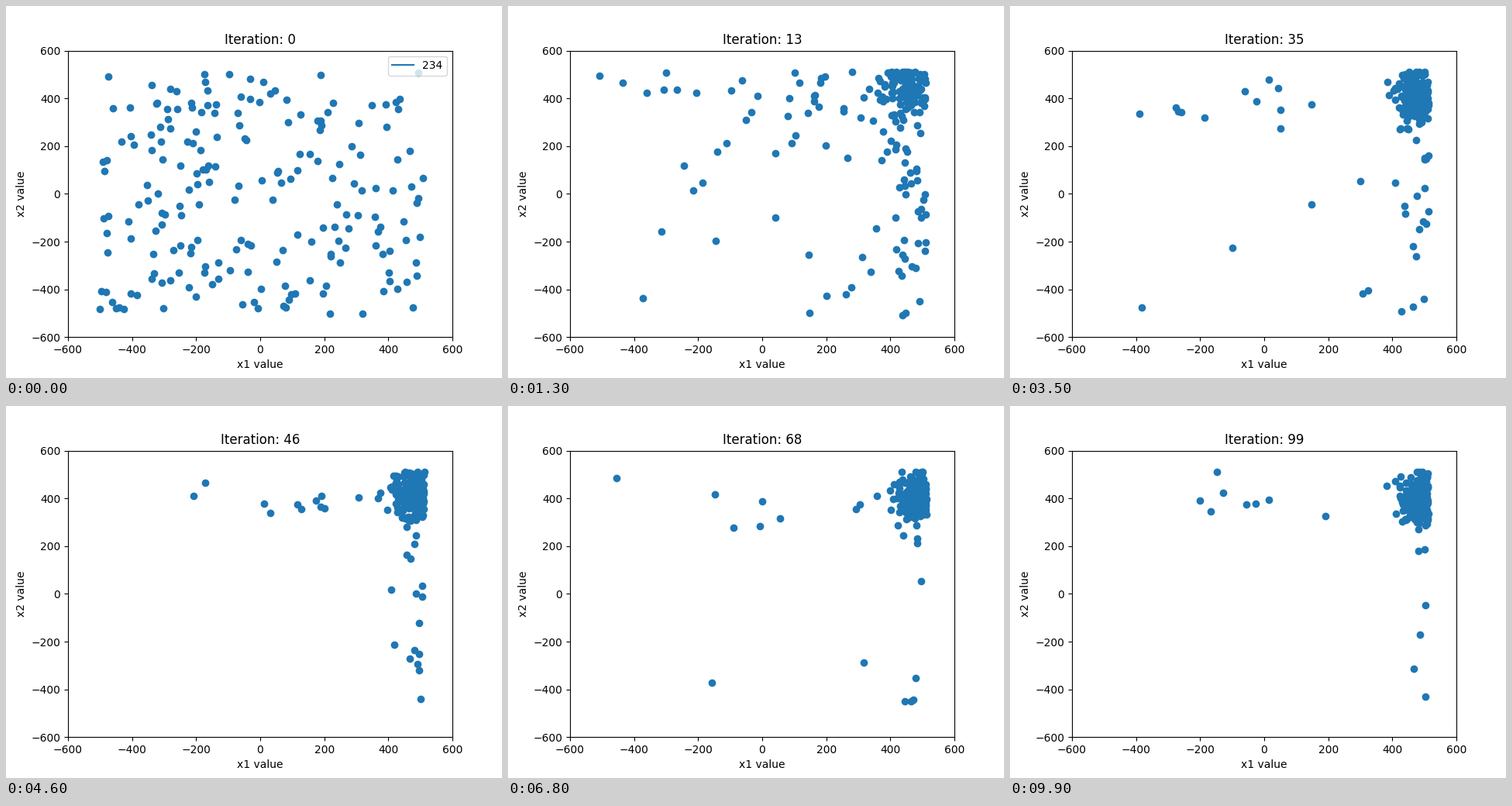
A matplotlib script that plays this animation: 640x480 px, repeating every 10 s.

```python
import matplotlib.pyplot as plt
import numpy as np
from matplotlib.animation import FuncAnimation

GENERATIONS = 100
POP_SIZE = 200
LIMIT = 512

plt.rcParams["text.kerning_factor"] = 6


def coordinate(rng, mean, sd, p_spread, skew):
    """Values gathered around mean, a share of them trailing off to -LIMIT."""
    core = rng.normal(mean, sd, POP_SIZE)
    core = LIMIT - np.abs(LIMIT - core)
    spread = LIMIT - 2 * LIMIT * rng.random(POP_SIZE) ** skew
    return np.where(rng.random(POP_SIZE) < p_spread, spread, core)


def population(gen):
    """Uniform at first, then closing in on the upper right corner."""
    rng = np.random.default_rng(500 + gen)
    settled = 1 - np.exp(-gen / 18)
    skew = 1 + 1.5 * settled
    p_x = 0.1 + 0.9 * np.exp(-gen / 12)
    p_y = 0.1 + 0.9 * np.exp(-gen / 17)
    x = coordinate(rng, 420 + 66 * settled, 50 - 20 * settled, p_x, skew)
    y = coordinate(rng, 470 - 72 * settled, 42 + 12 * settled, p_y, skew)
    return np.column_stack([x, y])


fig, ax = plt.subplots(figsize=(6.4, 4.8), dpi=100)
ax.set(xlim=(-600, 600), ylim=(-600, 600),
       xlabel="x1 value", ylabel="x2 value")
dots = ax.scatter([], [], color="C0")
ax.plot([], [], color="C0", label="234")
legend = ax.legend(loc="upper right")
title = ax.set_title("Iteration: 0")


def update(gen):
    dots.set_offsets(population(gen))
    title.set_text(f"Iteration: {gen}")
    legend.set_visible(gen == 0)
    return dots, title, legend


anim = FuncAnimation(fig, update, frames=GENERATIONS, interval=100,
                     repeat=True, repeat_delay=0)
plt.show()
```
